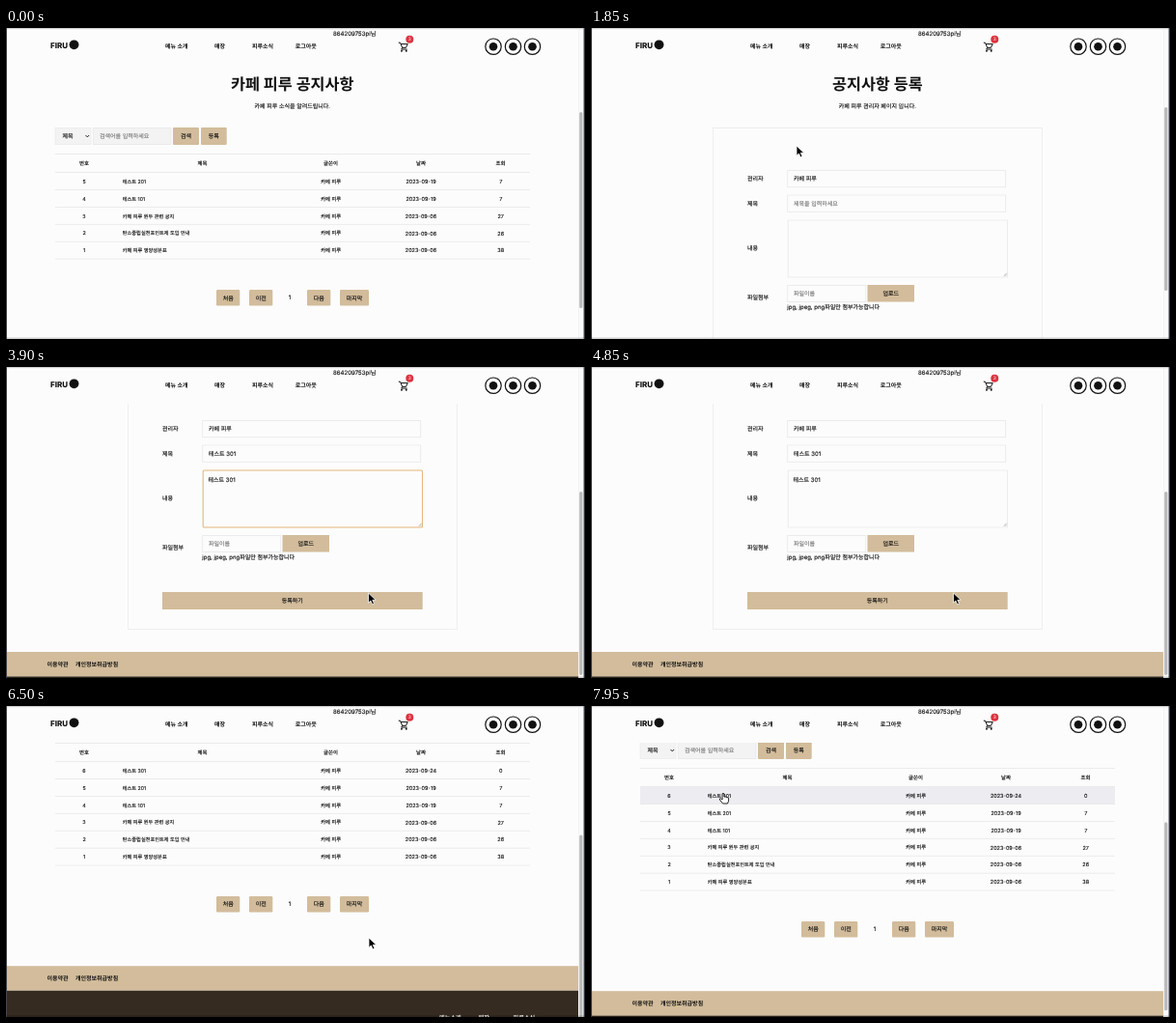
Write an HTML page that moves like this. It is 600 px wide and 322 px high and loops after 8 s.

```html
<!DOCTYPE html>
<html lang="ko">
<head>
<meta charset="utf-8">
<title>카페 공지사항</title>
<style>
html, body { margin: 0; width: 100%; height: 100%; overflow: hidden; background: #fcfcfc; }
svg { display: block; width: 100vw; height: 100vh; }
text {
  font-family: Inter, "Noto Sans CJK KR", "Noto Sans CJK JP", "Noto Sans CJK", sans-serif;
  white-space: pre; text-rendering: geometricPrecision;
}
</style>
</head>
<body>
<svg id="stage" viewBox="0 0 600 322" lang="ko"></svg>
<script>
const LOOP = 8000;
const BG = '#fcfcfc', TAN = '#d2bc9b', DARK = '#352b20', INK = '#111', LINE = '#e8e8e8', RED = '#dc3340';
const BOLD = { weight: 700, thick: 0 }, HINT = { fill: '#707070', thick: 0.08 };
const stage = document.getElementById('stage');

// Drawing helpers
const rect = (x, y, w, h, fill, extra = '') =>
  `<rect x="${x}" y="${y}" width="${w}" height="${h}" fill="${fill}" ${extra}/>`;
const disc = (x, y, r, fill, extra = '') =>
  `<circle cx="${x}" cy="${y}" r="${r}" fill="${fill}" ${extra}/>`;
const text = (x, y, str, size = 6, { fill = INK, weight = 400, anchor = 'start', thick = 0.14 } = {}) =>
  `<text x="${x}" y="${y + size * 0.36}" font-size="${size}" font-weight="${weight}" text-anchor="${anchor}" ` +
  `fill="${fill}" stroke="${fill}" stroke-width="${thick}">${str}</text>`;
const mid = (x, y, str, size, opts) => text(x, y, str, size, { anchor: 'middle', ...opts });
const group = (x, y, body) => `<g transform="translate(${x} ${y})">${body}</g>`;
const button = (x, y, w, h, label, r = 0) =>
  rect(x, y, w, h, TAN, `rx="${r}"`) + mid(x + w / 2, y + h / 2, label, 6);
const field = (x, y, w, h, focus) =>
  rect(x, y, w, h, BG, focus
    ? 'rx="1" stroke="#e6b77c" stroke-width="1.1"'
    : 'stroke="#e8e8e8" stroke-width=".8"');

// Timing helpers
const ease = p => p * p * (3 - 2 * p);
function track(keys, t) {
  let i = 0;
  while (i < keys.length - 1 && keys[i + 1][0] <= t) i++;
  const a = keys[i], b = keys[i + 1];
  if (!b) return a.slice(1);
  const p = ease(Math.max(0, (t - a[0]) / (b[0] - a[0])));
  return a.slice(1).map((v, k) => v + (b[k + 1] - v) * p);
}
function step(keys, t) {
  let value = keys[0][1];
  for (const [at, v] of keys) if (t >= at) value = v;
  return value;
}

const SCROLL = [[0, 0], [3300, 0], [3720, 92], [6850, 92], [7050, 82], [7250, 66], [8000, 66]];
const POINTER = [
  [0, 252, 214], [150, 252, 210], [750, 214, 114], [1250, 214, 114], [1500, 213, 122], [1850, 213, 122],
  [2050, 262, 180], [2500, 262, 180], [2720, 370.5, 226], [3350, 370.5, 226], [3800, 375.5, 234],
  [5200, 375.5, 234], [5700, 376, 240], [6500, 376, 240], [7000, 379, 227], [7150, 379, 227],
  [7600, 137, 90], [8000, 137, 90]
];
const SHAPE = [
  [0, 'none'], [150, 'arrow'], [700, 'hand'], [1250, 'arrow'], [1990, 'beam'], [2100, 'none'],
  [2520, 'beam'], [2950, 'none'], [3350, 'beam'], [3650, 'arrow'], [7480, 'hand']
];
const PAGE = [[0, 'list'], [1250, 'form'], [5600, 'list']];
const FOCUS = [[0, ''], [2050, 'title'], [2720, 'body'], [4450, '']];

const KEYS = ['', 'ㅌ', '테', '텟', '테스', '테슽', '테스트', '테스트 ', '테스트 3', '테스트 30', '테스트 301'];
const typed = (t, start, gap) => KEYS[Math.max(0, Math.min(10, Math.floor((t - start) / gap) + 1))];

const SHOP = '카페 피루';
const POSTS = [
  ['테스트 301', '2023-09-24', 0],
  ['테스트 201', '2023-09-19', 7],
  ['테스트 101', '2023-09-19', 7],
  [SHOP + ' 원두 관련 공지', '2023-09-06', 27],
  ['탄소중립실천포인트제 도입 안내', '2023-09-06', 26],
  [SHOP + ' 영양성분표', '2023-09-06', 38]
];
const ROW = 17.9, TOP = 149.6;

function heading(title, sub) {
  return mid(296.8, 58, title, 16.3, BOLD) + mid(296.8, 81, sub, 6);
}

function list(posts, hover) {
  let s = heading(SHOP + ' 공지사항', SHOP + ' 소식을 알려드립니다.');
  s += rect(51, 103.5, 37, 17, '#f3f3f3', 'stroke="#ebebeb" stroke-width=".7"') + text(58.5, 112, '제목', 6) +
    '<path d="M82.5 111l1.8 1.9 1.8-1.9" fill="none" stroke="#111" stroke-width=".9"/>';
  s += rect(90.3, 103.5, 80.7, 17, '#f3f3f3', 'stroke="#e6e6e6" stroke-width=".7"') +
    text(97, 112, '검색어를 입력하세요', 6, HINT);
  s += button(173, 103, 27, 18, '검색', 1) + button(202, 103, 26.7, 18, '등록', 1);

  s += rect(51, 130, 492, 0.8, LINE);
  [[81, '번호'], [203.5, '제목'], [336.5, '글쓴이'], [430, '날짜'], [512.5, '조회']]
    .forEach(([x, label]) => s += mid(x, 140, label, 5.4, BOLD));
  posts.forEach(([title, date, views], i) => {
    const y = TOP + i * ROW, c = y + ROW / 2 + 0.3;
    if (i === hover) s += rect(51, y, 492, ROW, '#ececf1');
    s += rect(51, y - 0.4, 492, 0.8, LINE) + mid(81, c, posts.length - i, 5.3) + text(120.8, c, title, 5.2) +
      mid(336.7, c, SHOP, 5.3) + mid(430, c, date, 5.5) + mid(512.7, c, views, 5.5);
  });
  const end = TOP + posts.length * ROW;
  s += rect(51, end - 0.4, 492, 0.8, LINE);
  const y = end + 32;
  s += button(218, y, 24.3, 16.5, '처음', 1.3) + button(252, y, 24.3, 16.5, '이전', 1.3) +
    mid(294, y + 8.2, '1', 6) + button(312, y, 24.3, 16.5, '다음', 1.3) + button(346, y, 30, 16.5, '마지막', 1.3);
  return s + footer(end + 104.2);
}

function form(t) {
  const focus = step(FOCUS, t);
  const title = typed(t, 2120, 38), body = typed(t, 2950, 32);
  const caret = (str, y) => rect(209.8 + str.length * 3 + (str ? 2 : 0), y - 4, 0.6, 8, '#666');
  let s = heading('공지사항 등록', SHOP + ' 관리자 페이지 입니다.');
  s += rect(126.5, 103.5, 341, 260, 'none', 'stroke="#ebebeb" stroke-width=".8"');
  [['관리자', 156], ['제목', 181.5], ['내용', 228], ['파일첨부', 279.2]]
    .forEach(([label, y]) => s += text(162, y, label, 6));
  s += field(203.7, 147.5, 226, 17.3) + text(210, 156, SHOP, 6);
  s += field(203.7, 173, 226, 17.3, focus === 'title') +
    (title ? text(210, 181.7, title, 6) : text(210, 181.7, '제목을 입력하세요', 6, HINT));
  if (focus === 'title' && title.length < 7) s += caret(title, 181.5);
  s += field(204.2, 199, 227.3, 59, focus === 'body') + text(209.5, 209.3, body, 6) +
    '<path d="M427.7 256.8l3-3m-1.2 3l1.2-1.2" stroke="#888" stroke-width=".6"/>';
  if (focus === 'body' && body.length < 7) s += caret(body, 209);
  s += field(203.7, 266.5, 81, 17) + text(210, 275, '파일이름', 6, HINT) +
    button(286.5, 266, 48.5, 17.5, '업로드') +
    text(203.3, 288.4, 'jpg, jpeg, png파일만 첨부가능합니다', 6) +
    button(162, 325, 269.7, 18, '등록하기');
  return s + footer(387);
}

function footer(y) {
  const white = { ...BOLD, fill: '#fff' };
  let s = rect(1, 0, 592, 25.5, TAN) + rect(1, 25.5, 592, 160, DARK) +
    text(42.5, 12.7, '이용약관', 6, BOLD) + text(72, 12.7, '개인정보취급방침', 6, BOLD) +
    text(42.5, 59.5, 'FIRU', 8, { fill: '#fff', weight: 800, thick: 0 }) + disc(69.5, 58, 4.6, '#fff');
  [88, 105.8, 123.8].forEach(x => s += disc(x, 60, 6.6, '#fff'));
  [[449, '메뉴소개', '음료'], [489.5, '매장', '매장찾기'], [525.5, '피루소식', '공지사항']].forEach(([x, head, sub]) =>
    s += text(x, 54, head, 6.2, white) + text(x, 68.3, sub, 5, { fill: '#ddd', thick: 0 }));
  return group(0, y, s);
}

// Placeholder the browser shows for an image that has not loaded
const missing = (x, y, alt) =>
  rect(x, y - 3, 5.6, 6, '#e6eef8', 'stroke="#999" stroke-width=".6"') +
  `<path d="M${x + 0.4} ${y + 2.7}l2.2-2.6 2.6 2.6z" fill="#4a9b4a"/>` + text(x + 6.7, y, alt, 6);

function header(loading) {
  const items = [[165, '메뉴 소개'], [216, '매장'], [255, '피루소식'], [299.7, '로그아웃']];
  const menu = items.map(([x, label]) => text(x, 18.6, label, 6, BOLD)).join('') +
    text(339, 6, '864209753pi님', 6.1) +
    '<path d="M406.8 15.2h1.7l2.2 5.2h3.7l1.9-3.8h-7.2M410.7 20.4l-1 1.7h6" fill="none" stroke="#111" stroke-width="1"/>' +
    disc(410, 23.7, 0.95, INK) + disc(414.8, 23.7, 0.95, INK) +
    disc(418.3, 11.7, 4, RED) + mid(418.3, 11.7, '3', 4.8, { fill: '#fff', thick: 0 });
  let s = rect(1, 0, 592, 38, BG) + group(loading ? -42 : 0, 0, menu);
  if (loading) {
    s += missing(29, 15, '피루카페') + missing(412.5, 15, '프로젝트 코드방 로고') +
      missing(475, 15, '메모 이미지') + missing(514, 15, '모아마당 로고');
  } else {
    s += text(46, 18.5, 'FIRU', 8, { weight: 800, thick: 0 }) + disc(70.5, 17.3, 4.9, INK);
    [505, 525.5, 545.5].forEach(x =>
      s += disc(x, 19.2, 8.2, '#fff', 'stroke="#111" stroke-width="1.2"') + disc(x, 19.2, 4.3, INK));
  }
  return s;
}

function pointer(t, x, y) {
  const art = {
    none: '',
    arrow: '<path d="M0 0v10.2l2.4-2.2 1.7 3.8 1.9-.8-1.7-3.7h3.4z" fill="#000" stroke="#fff" stroke-width=".8"/>',
    beam: '<path d="M-2.4-5Q0-5 0-3.6Q0-5 2.4-5M0-3.6V3.6M-2.4 5Q0 5 0 3.6Q0 5 2.4 5M-1.2 1.6h2.4" fill="none" stroke="#111" stroke-width=".9"/>',
    hand: '<path d="M-.9.8Q0-.4.9.8V4l1.6.1 1.5.4 1.6.7v3L4.5 11H-.4L-3.6 7q-.4-1.6 1-1.2L-.9 7z" fill="#fff" stroke="#111" stroke-width=".9" stroke-linejoin="round"/>'
  };
  return group(x.toFixed(2), y.toFixed(2), art[step(SHAPE, t)]);
}

function scene(t) {
  const page = step(PAGE, t);
  const [scroll] = track(SCROLL, t);
  const [px, py] = track(POINTER, t);
  const loading = (t >= 1250 && t < 1400) || (t >= 5600 && t < 6000);
  const posts = t >= 6100 ? POSTS : POSTS.slice(1);
  const onRows = (t >= 150 && t < 1250) || t >= 7150;
  const row = onRows ? Math.floor((py + scroll - TOP) / ROW) : -1;

  const body = page === 'form' ? form(t) : list(posts, row);
  const [y0, rate, size] = page === 'form' ? [82, 0.51, 190]
    : posts.length === 6 ? [87, 0.505, 195] : [87, 0.533, 203];

  return rect(0, 0, 600, 322, BG) + group(0, -scroll.toFixed(2), body) + header(loading) +
    rect(593, 0, 5.6, 322, '#fafafa') + rect(593, 0, 0.5, 322, '#ececec') +
    rect(594.2, y0 + scroll * rate, 3.2, size, '#b9b9b9', 'rx="1.6"') +
    rect(0, 0, 600, 1.2, '#cfd0d2') + rect(0, 0, 1, 322, '#45484d') + rect(598.6, 0, 1.4, 322, '#343a44') +
    rect(0, 320.5, 600, 1.5, '#000', 'opacity=".18"') + pointer(t, px, py);
}

let last = '';
function draw() {
  const next = scene(performance.now() % LOOP);
  if (next !== last) stage.innerHTML = last = next;
  requestAnimationFrame(draw);
}
draw();
</script>
</body>
</html>
```
